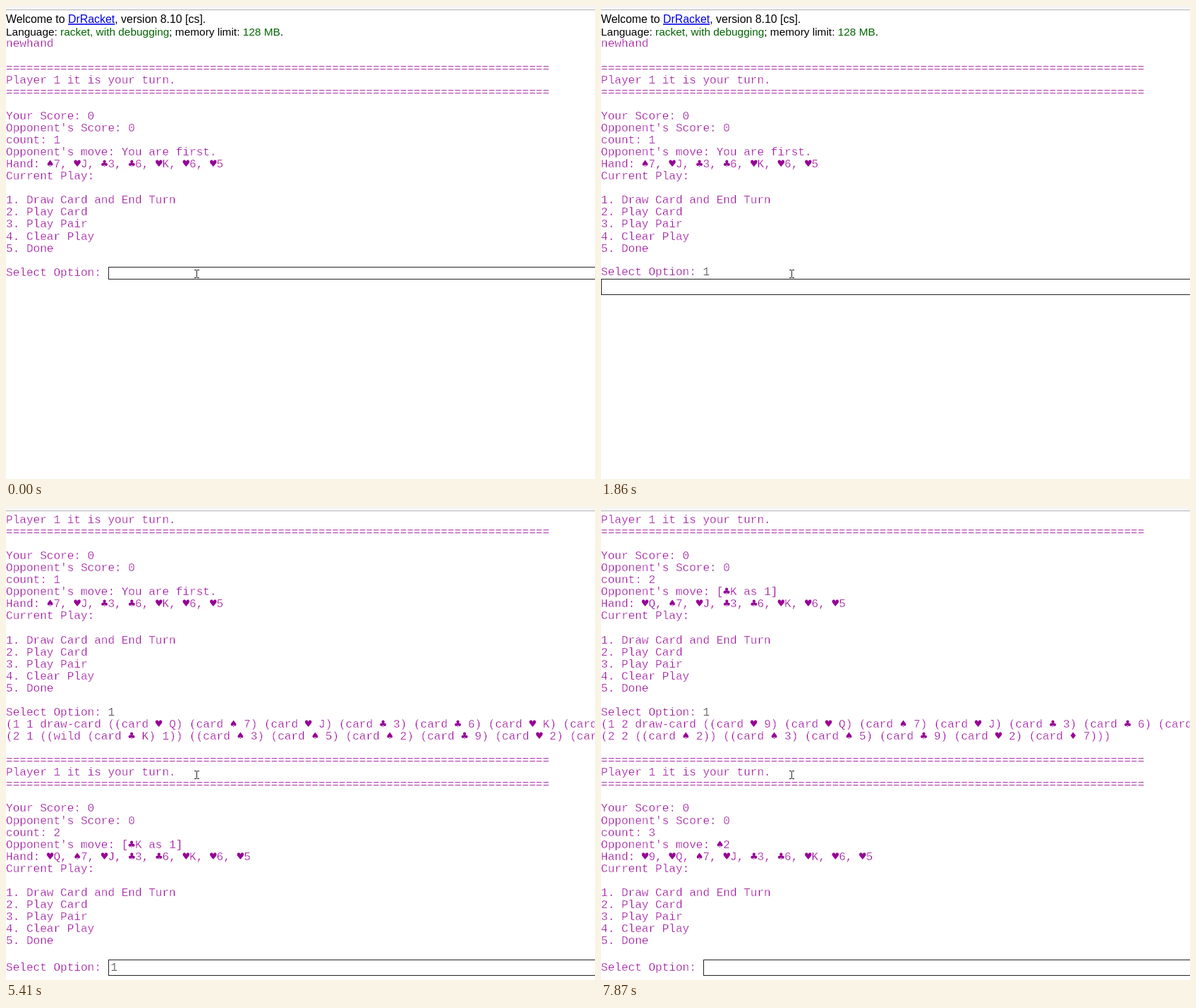
An HTML page for the animation above (8000 ms loop, 835 by 671 pixels).

```html
<!DOCTYPE html>
<html lang="en">
<head>
<meta charset="utf-8">
<title>Card game console</title>
<style>
  html, body { margin: 0; width: 100%; height: 100%; overflow: hidden; background: #fff; }
  svg { display: block; width: 835px; height: 671px; }
  text { white-space: pre; }
  /* The white stroke thins the letters to a light typewriter weight. */
  .mono {
    font-family: "Liberation Mono", "Courier New", monospace; font-size: 16.06px;
    fill: #960096; stroke: #fff; stroke-width: .4px;
  }
  .suit { font-family: "DejaVu Sans Mono", monospace; font-size: 16px; stroke: none; }
  .sans { font-family: "Liberation Sans", Arial, sans-serif; fill: #000; }
  .typed { fill: #262626; }
  .green { fill: #006400; }
  .link { fill: #0000e6; text-decoration: underline; }
  .line { fill: none; stroke: #222; shape-rendering: crispEdges; }
</style>
</head>
<body>
<svg viewBox="0 0 835 671">
  <defs><clipPath id="view"><rect width="835" height="667"/></clipPath></defs>
  <rect width="835" height="671" fill="#fff"/>
  <rect width="835" height="5" fill="#f5f5f5"/>
  <rect y="5" width="835" height="1" fill="#b4b4b4"/>
  <g id="banner" class="sans">
    <text y="24" font-size="15.9">Welcome to <tspan class="link">DrRacket</tspan>, version 8.10 [cs].</text>
    <text y="42" font-size="15.42">Language: <tspan class="green">racket, with debugging</tspan>; memory limit: <tspan class="green">128 MB</tspan>.</text>
  </g>
  <g id="screens"></g>
  <g clip-path="url(#view)">
    <text id="prompt" class="mono"></text>
    <rect id="field" class="line" width="900"/>
    <text id="entry" class="mono typed" x="148.5">1</text>
    <path id="caret" class="line"/>
  </g>
  <path class="line" d="M267 374.5h3M271 374.5h3M270.5 375v10M267 385.5h3M271 385.5h3"/>
</svg>
<script>
const LOOP = 8000, PITCH = 17.07;
const el = id => document.getElementById(id);
const make = (tag, attrs = {}) => setAll(document.createElementNS("http://www.w3.org/2000/svg", tag), attrs);
const rule = "=".repeat(80);
const cards = list => list.split(" ").map(c => `(card ${c[0]} ${c[1]})`).join(" ");

function setAll(node, attrs) {
  for (const key in attrs) node.setAttribute(key, attrs[key]);
  return node;
}

// One turn, from the player line down to the blank line above the prompt.
const turn = (count, move, hand) => [
  "Player 1 it is your turn.", rule, "",
  "Your Score: 0", "Opponent's Score: 0", "count: " + count,
  "Opponent's move: " + move,
  "Hand: " + hand.split(" ").join(", "),
  "Current Play:", "",
  "1. Draw Card and End Turn", "2. Play Card", "3. Play Pair", "4. Clear Play", "5. Done", ""
];

const hand1 = "♠7 ♥J ♣3 ♣6 ♥K ♥6 ♥5", hand2 = "♥Q " + hand1, hand3 = "♥9 " + hand2;
const turn1 = turn(1, "You are first.", hand1);
const turn2 = turn(2, "[♣K as 1]", hand2);
const turn3 = turn(3, "♠2", hand3);
const prompt = "Select Option: ";

const pages = [
  { top: 58.4, lines: ["newhand", "", rule, ...turn1] },
  { top: 22.8, lines: [...turn1, prompt + "1",
    `(1 1 draw-card (${cards(hand2)}))`,
    `(2 1 ((wild (card ♣ K) 1)) (${cards("♠3 ♠5 ♠2 ♣9 ♥2 ♦7")}))`,
    "", rule, ...turn2] },
  { top: 22.8, lines: [...turn2, prompt + "1",
    `(1 2 draw-card (${cards(hand3)}))`,
    `(2 2 ((card ♠ 2)) (${cards("♠3 ♠5 ♣9 ♥2 ♦7")}))`,
    "", rule, ...turn3] }
];

// Suits and the answer after the prompt get their own style.
function fillLine(node, line) {
  const parts = line.split(/([♠♥♣♦]|(?<=^Select Option: ).+)/);
  node.replaceChildren(...parts.map((part, i) => {
    if (i % 2 === 0) return part;
    const span = make("tspan", { class: line.startsWith(prompt) ? "typed" : "suit" });
    span.textContent = part;
    return span;
  }));
}

const screens = pages.map(({ top, lines }) => {
  const group = make("g", { class: "mono" });
  lines.forEach((line, i) => {
    const node = make("text", { y: Math.round(top + i * PITCH) });
    fillLine(node, line);
    group.append(node);
  });
  el("screens").append(group);
  return group;
});

// Input layouts: prompt text and baseline, field corner and height, caret height.
const inputs = {
  slim:  { text: prompt, base: 383, x: 145.5, y: 370.5, h: 17, bar: 12 },
  upper: { text: prompt, base: 386, x: 145.5, y: 370.5, h: 22, bar: 17 },
  sentUpper: { text: prompt + "1", base: 382, x: 0.5, y: 387.5, h: 22, bar: 17 },
  lower: { text: prompt, base: 658, x: 145.5, y: 642.5, h: 22, bar: 17 },
  sentLower: { text: prompt + "1", base: 654, x: 0.5, y: 659.5, h: 22, bar: 17 }
};

// start, page, input, typed, times at which the caret flips (hidden at first)
const phases = [
  [0, 0, "slim", false, [400, 990, 1430]],
  [1580, 0, "upper", true, [1580]],
  [1860, 0, "sentUpper", false, []],
  [2390, 1, "lower", false, [2390, 2950, 3350, 3880, 4410, 4970]],
  [5410, 1, "lower", true, [5840]],
  [5960, 1, "sentLower", false, []],
  [6230, 2, "lower", false, [6350, 6910, 7440, 7870]]
];

const show = (node, on) => node.setAttribute("display", on ? "inline" : "none");

function draw(t) {
  const [, page, name, typed, flips] = phases.filter(p => p[0] <= t).pop();
  const box = inputs[name];
  screens.forEach((group, i) => show(group, i === page));
  show(el("banner"), page === 0);
  fillLine(el("prompt"), box.text);
  setAll(el("prompt"), { y: box.base });
  setAll(el("field"), { x: box.x, y: box.y, height: box.h });
  setAll(el("entry"), { y: box.base });
  show(el("entry"), typed);
  setAll(el("caret"), { d: `M${box.x + (typed ? 13 : 3)} ${box.y + 2.5}v${box.bar}` });
  show(el("caret"), flips.filter(f => f <= t).length % 2 === 1);
}

const start = performance.now();
function tick() {
  draw((performance.now() - start) % LOOP);
  requestAnimationFrame(tick);
}
tick();
</script>
</body>
</html>
```
